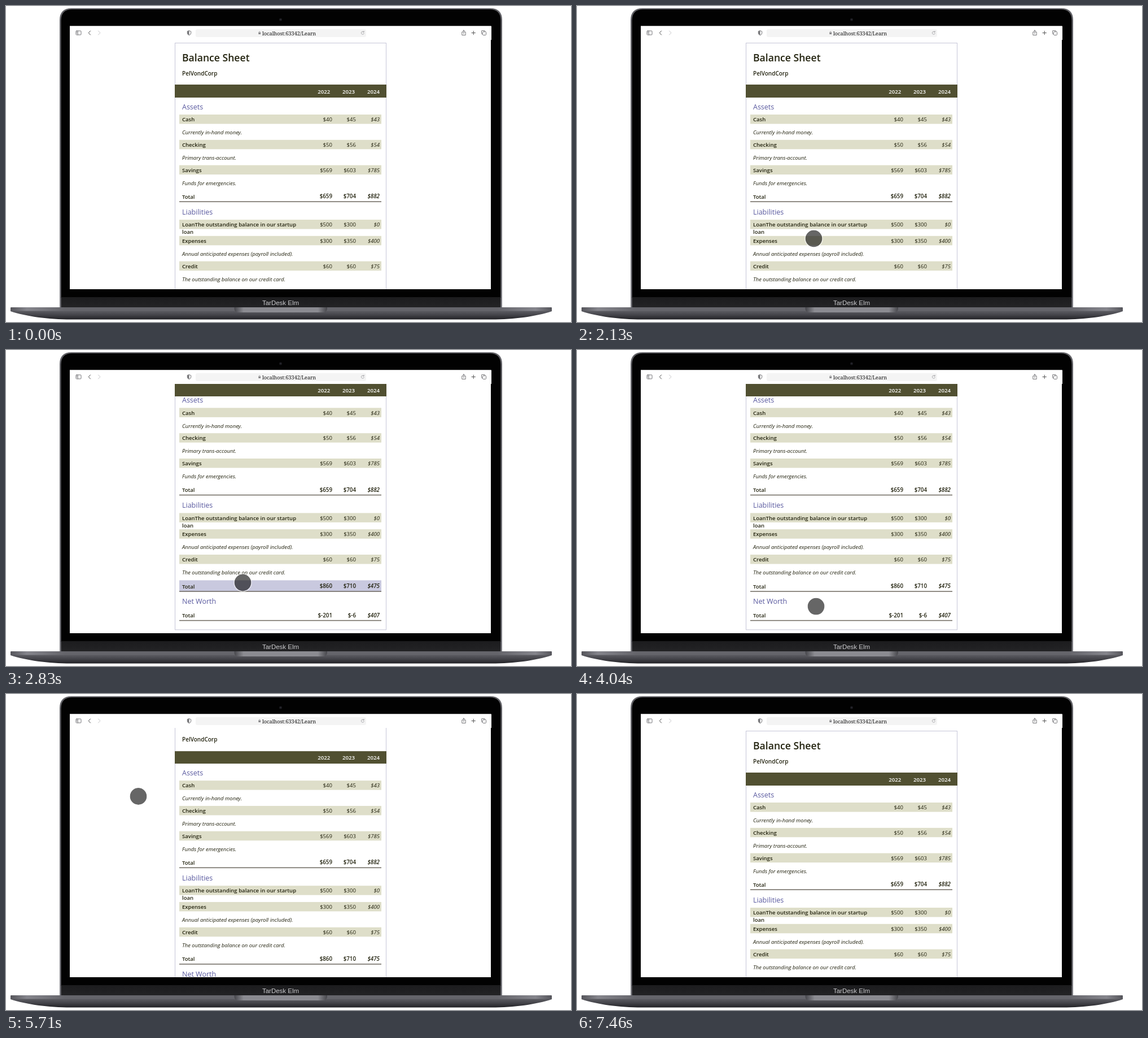
An HTML page that plays this animation: 1001x559 px, repeating every 7620 ms.

```html
<!DOCTYPE html>
<html lang="en">
<head>
<meta charset="utf-8">
<title>Balance Sheet</title>
<style>
html, body { margin: 0; width: 100%; height: 100%; overflow: hidden; background: #fff; }
svg { display: block; }
text { font: 600 9.55px "Open Sans", "Noto Sans", sans-serif; fill: #23230f; }
.title { font-size: 17.6px; }
.company { font-size: 10px; }
.caption { font-size: 12.5px; font-weight: 500; fill: #5a5a9f; }
.note { font-style: italic; font-weight: 500; font-size: 9.5px; }
.num { font-weight: 500; text-anchor: end; }
.sum { font-size: 9.8px; text-anchor: end; }
.now { font-style: italic; }
.year { font-size: 9.7px; fill: #fff; text-anchor: end; }
.url { font: 9.1px "Noto Serif", serif; fill: #111; }
.brand { font: 11.5px "Liberation Sans", Arial, sans-serif; fill: #c9c9cc; text-anchor: middle; }
.icon { fill: none; stroke: #77777a; stroke-width: 1; stroke-linecap: round; stroke-linejoin: round; }
</style>
</head>
<body>
<svg width="1001" height="559" viewBox="0 0 1001 559">
  <defs>
    <linearGradient id="edge" x2="0" y2="1">
      <stop offset="0" stop-color="#606065"/><stop offset="1" stop-color="#7c7c82"/>
    </linearGradient>
    <linearGradient id="chin" x2="0" y2="1">
      <stop offset="0" stop-color="#1c1c1e"/><stop offset="1" stop-color="#232325"/>
    </linearGradient>
    <linearGradient id="deck">
      <stop offset="0" stop-color="#55555b"/><stop offset=".03" stop-color="#85858c"/>
      <stop offset=".1" stop-color="#65656b"/><stop offset=".9" stop-color="#65656b"/>
      <stop offset=".97" stop-color="#85858c"/><stop offset="1" stop-color="#55555b"/>
    </linearGradient>
    <linearGradient id="under" x2="0" y2="1">
      <stop offset="0" stop-color="#606066"/><stop offset=".5" stop-color="#45454b"/><stop offset="1" stop-color="#222226"/>
    </linearGradient>
    <linearGradient id="lip">
      <stop offset="0" stop-color="#47474c"/><stop offset=".1" stop-color="#8b8b91"/>
      <stop offset=".9" stop-color="#8b8b91"/><stop offset="1" stop-color="#47474c"/>
    </linearGradient>
    <clipPath id="view"><rect x="113" y="60" width="746" height="441"/></clipPath>
  </defs>

  <!-- laptop -->
  <path d="M95 534V25Q95 4 116 4H858Q879 4 879 25V534Z" fill="url(#edge)"/>
  <path d="M97.5 516V26Q97.5 6 117 6H857Q876.5 6 876.5 26V516Z" fill="#020202"/>
  <path d="M97.5 515H876.5V533H97.5Z" fill="url(#chin)"/>
  <circle cx="486.5" cy="24" r="2.6" fill="#17171b"/>
  <circle cx="486.5" cy="24" r="1" fill="#303038"/>
  <path d="M8 538H967V540C940 549 900 554.5 860 554.5H115C75 554.5 35 549 8 540Z" fill="url(#under)"/>
  <rect x="8" y="533" width="959" height="6.5" rx="1" fill="url(#deck)"/>
  <path d="M404.5 533H569V536Q568 542 561 542H412Q405 542 404.5 536Z" fill="url(#lip)"/>
  <text class="brand" x="486.5" y="528.5">TarDesk Elm</text>
  <rect x="113" y="35.5" width="746" height="465.5" fill="#fff"/>

  <!-- page -->
  <g clip-path="url(#view)">
    <g id="page"></g>
    <g id="head">
      <rect id="seam" x="299" y="139" width="375" height="1.5" fill="#515031"/>
      <rect x="299" y="140" width="375" height="22" fill="#515031"/>
      <text class="year" x="574.3" y="154.5">2022</text>
      <text class="year" x="618" y="154.5">2023</text>
      <text class="year" x="662" y="154.5">2024</text>
    </g>
  </g>

  <!-- browser bar -->
  <rect x="113" y="35.5" width="747" height="24.5" fill="#fff"/>
  <rect x="336" y="41" width="302" height="14" rx="3" fill="#f4f4f4"/>
  <text class="url" x="454" y="52.2">localhost:63342/Learn</text>
  <g class="icon">
    <rect x="124" y="44" width="9" height="7" rx="1"/>
    <path d="M127.2 44V51M125.2 46H126M125.2 48H126"/>
    <path d="M149.5 44L146.2 47.5L149.5 51" stroke="#444"/>
    <path d="M163.5 44L166.8 47.5L163.5 51" stroke="#c4c4c6"/>
    <path d="M324.5 43.7L327.7 45V48Q327.5 50.5 324.5 51.7Q321.5 50.5 321.3 48V45Z"/>
    <path d="M324.5 43.7V51.7Q321.5 50.5 321.3 48V45Z" fill="#77777a" stroke="none"/>
    <path d="M448 47V46Q449.2 44 450.4 46V47" stroke-width=".7"/>
    <rect x="447.3" y="47" width="3.8" height="3" fill="#88888b" stroke="none"/>
    <path d="M634 46A2.6 2.6 0 1 0 634.4 48.4M634.2 44.3V46.2H632.3" stroke="#9a9a9d" stroke-width=".8"/>
    <path d="M809.5 46H807.8V51.5H814.2V46H812.5M811 49V43M809.3 44.5L811 42.8L812.7 44.5"/>
    <path d="M825 47.5H831.4M828.2 44.3V50.7" stroke="#555"/>
    <rect x="844.5" y="45.5" width="6" height="6" rx="1" fill="#fff"/>
    <path d="M844.5 49.5H843.2Q842.5 49.5 842.5 48.8V44.2Q842.5 43.5 843.2 43.5H847.8Q848.5 43.5 848.5 44.2V45.5"/>
  </g>

  <g id="cursor">
    <circle r="15" fill="#000" fill-opacity=".6"/>
    <circle r="15.5" fill="none" stroke="#fff" stroke-opacity=".75" stroke-width="1.2"/>
  </g>
</svg>
<script>
const $ = id => document.getElementById(id);
const label = (cls, x, y, s) => `<text class="${cls}" x="${x}" y="${y}">${s}</text>`;
const values = (cls, y, list) => list.map((v, i) =>
  label(cls + (i === 2 ? " now" : ""), 578 + 42 * i, y, "$" + v)).join("");

const item = (y, name, list, note) =>
  `<rect x="307" y="${y}" width="358" height="16.5" fill="#dedec9"/>` +
  label("", 312, y + 12.2, name) + values("num", y + 12.2, list) +
  (note ? label("note", 312, y + 35.2, note) : "");

const totals = [[346, 659, 704, 882], [516.5, 860, 710, 475], [568, -201, -6, 407]];
const total = ([y, ...list]) =>
  `<rect class="hover" x="307" y="${y - 19.5}" width="358" height="20" fill="#c9c9df"/>` +
  `<rect x="307" y="${y - .6}" width="358" height="1.5" fill="#6d685f"/>` +
  label("", 312, y - 5.3, "Total") + values("sum", y - 5.8, list);

$("page").innerHTML =
  `<rect x="299.5" y="65.5" width="374" height="519" fill="#fff" stroke="#c6c6d8"/>` +
  label("title", 312, 98, "Balance Sheet") +
  label("company", 312, 122.8, "PelVondCorp") +
  label("caption", 312, 183, "Assets") +
  item(192, "Cash", [40, 45, 43], "Currently in-hand money.") +
  item(236.8, "Checking", [50, 56, 54], "Primary trans-account.") +
  item(281.6, "Savings", [569, 603, 785], "Funds for emergencies.") +
  label("caption", 312, 369, "Liabilities") +
  item(378, "LoanThe outstanding balance in our startup", [500, 300, 0]) +
  label("", 312, 403.3, "loan") +
  item(406.8, "Expenses", [300, 350, 400], "Annual anticipated expenses (payroll included).") +
  item(451.6, "Credit", [60, 60, 75], "The outstanding balance on our credit card.") +
  label("caption", 312, 538.8, "Net Worth") +
  totals.map(total).join("");
const hovers = document.querySelectorAll(".hover");

// pointer path: time, x, y
const path = [
  [0, 198, -17], [250, 198, -17], [900, 391, 298], [1130, 408, 330], [1330, 409, 336],
  [1750, 409, 336], [2130, 419.5, 411.5], [3790, 419.5, 411.5], [4170, 425, 469], [4880, 425, 469],
  [5080, 295.5, 330.5], [5260, 176, 225], [5500, 234.5, 181], [6210, 234.5, 181],
  [6630, 49, -13], [6790, 49, -13], [7000, 44, -20], [7620, 44, -20]
];

// a key next to a pause has no speed
function speed(i, k) {
  const a = path[i - 1], b = path[i], c = path[i + 1];
  if (!a || !c || a[k] === b[k] || b[k] === c[k]) return 0;
  return (c[k] - a[k]) / (c[0] - a[0]);
}

function pointer(t, k) {
  const i = path.findIndex(p => p[0] > t) - 1;
  const a = path[i], b = path[i + 1], d = b[0] - a[0], u = (t - a[0]) / d, v = 1 - u;
  return a[k] * v * v * (1 + 2 * u) + b[k] * u * u * (3 - 2 * u) +
    d * u * v * (speed(i, k) * v - speed(i + 1, k) * u);
}

function ease(t, from, to) {
  const u = Math.min(1, Math.max(0, (t - from) / (to - from)));
  return 1 - (1 - u) ** 2;
}

function draw(now) {
  const t = now % 7620;
  const scroll = 89.6 * (ease(t, 2460, 2830) - ease(t, 5670, 5790));
  const x = pointer(t, 1), y = pointer(t, 2);
  $("page").setAttribute("transform", `translate(0 ${-scroll})`);
  $("head").setAttribute("transform", `translate(0 ${-Math.min(scroll, 80)})`);
  $("seam").style.display = t < 2500 || t >= 7460 ? "" : "none";
  $("cursor").setAttribute("transform", `translate(${x} ${y})`);
  hovers.forEach((h, i) => {
    const dy = totals[i][0] - scroll - y;
    h.style.display = x > 307 && x < 665 && dy > -1 && dy < 20 ? "" : "none";
  });
  requestAnimationFrame(() => draw(performance.now() - start));
}
const start = performance.now();
draw(0);
</script>
</body>
</html>
```
